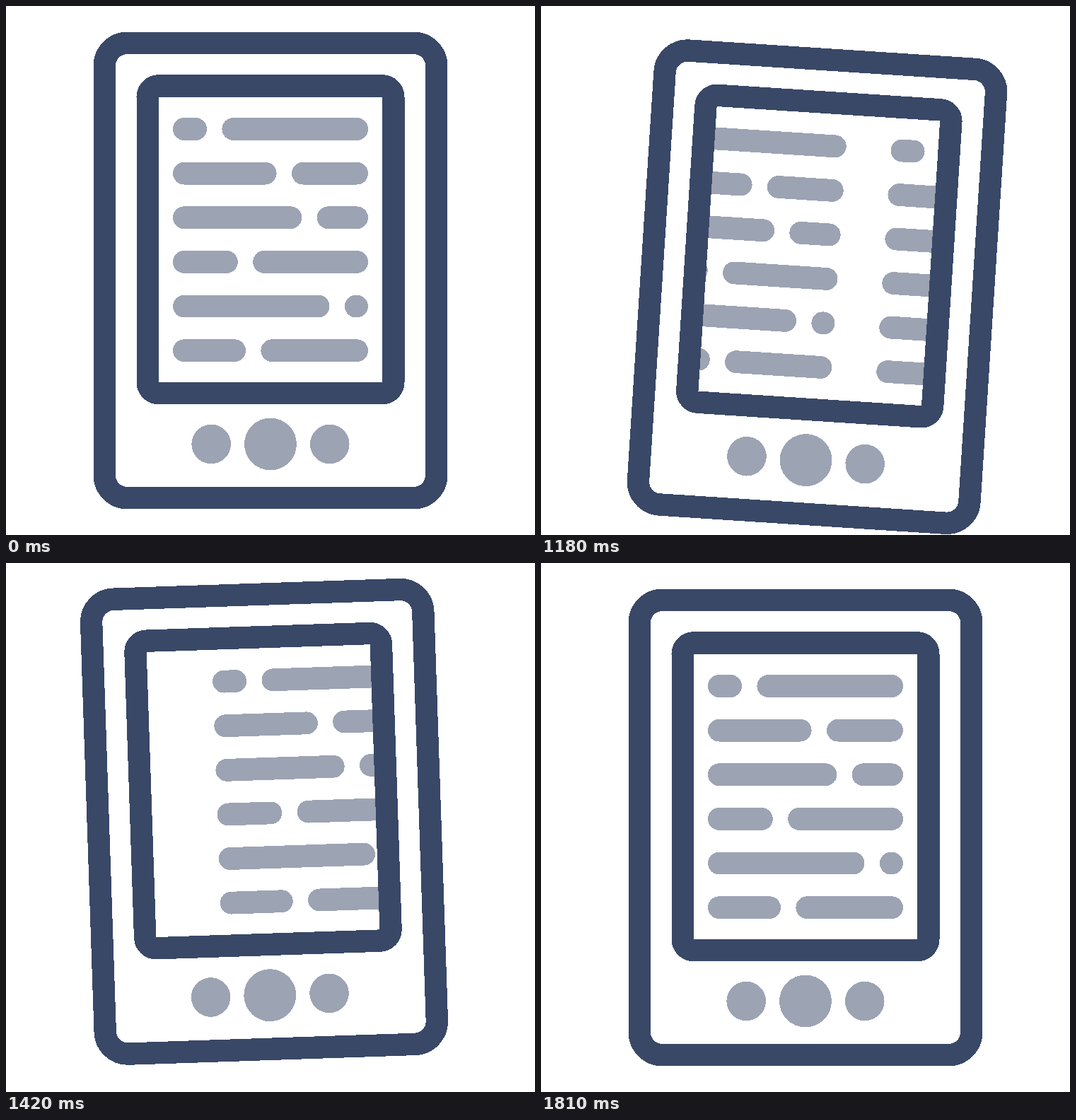
Animation, 748 px wide and 748 px high, one loop 1.84 s. Source, as an HTML page:

```html
<!DOCTYPE html>
<html lang="en">
<head>
<meta charset="utf-8">
<title>E-reader page turn</title>
<style>
  html, body { margin: 0; width: 100%; height: 100%; overflow: hidden; background: #fff; }
  svg { display: block; width: 100%; height: 100%; shape-rendering: crispEdges; }
  .frame { fill: none; stroke: #394867; stroke-width: 31.4; }
  .soft { fill: #9ca3b3; }
</style>
</head>
<body>
<svg viewBox="0 0 748 748">
  <defs>
    <clipPath id="screen"><rect x="200.2" y="112.9" width="347.6" height="434.8"/></clipPath>
    <g id="page" class="soft"></g>
  </defs>
  <g id="device">
    <g clip-path="url(#screen)">
      <use id="oldPage" href="#page"/>
      <use id="newPage" href="#page"/>
    </g>
    <rect class="frame" x="139.3" y="52.4" width="469.4" height="643.2" rx="32"/>
    <rect class="frame" x="200.2" y="112.9" width="347.6" height="434.8" rx="15.7"/>
    <g class="soft">
      <circle cx="290.2" cy="619.5" r="27.8"/>
      <circle cx="374" cy="619.5" r="37"/>
      <circle id="next" cx="457.8" cy="619.5" r="27.8"/>
    </g>
  </g>
</svg>
<script>
const $ = id => document.getElementById(id);
const LOOP = 1840, HOLD = 1030, STEP = 30;

// Each text row is a full-width line with one gap, given by where the gap starts.
const LEFT = 236, RIGHT = 512, GAP = 21.4;
const pill = (x1, x2, y) =>
  `<rect x="${x1}" y="${y - 15.9}" width="${x2 - x1}" height="31.8" rx="15.9"/>`;
$('page').innerHTML = [284, 382.6, 418.3, 327.8, 457.5, 339].map((gap, i) => {
  const y = 174 + i * 62.64;
  return pill(LEFT, gap, y) + pill(gap + GAP, RIGHT, y);
}).join('');

// Ease in and out from 0 to 1 between two steps.
function ease(n, from, to) {
  const t = Math.min(1, Math.max(0, (n - from) / (to - from)));
  return t * t * (3 - 2 * t);
}

// Swing right, then left, then settle.
const tilt = n => 4 * ease(n, 0, 5.3) - 6 * ease(n, 4.7, 14.6) + 2 * ease(n, 16, 25);
// Pushed down by the tap, rebounding slightly past rest.
const drop = n => 12.5 * ease(n, 0, 2.5) - 13.7 * ease(n, 2.5, 11) + 1.2 * ease(n, 11, 16);
const press = n => 1 - 0.55 * (ease(n, 0, 2.5) - ease(n, 2.5, 5.5));
const leave = n => -365 * ease(n, 0, 16.5);
const enter = n => 416 * Math.max(0, 1 - n / 26) ** 2.27;

function draw(now) {
  const ms = now % LOOP;
  const n = ms < HOLD ? 0 : Math.floor((ms - HOLD) / STEP) + 1;
  $('device').setAttribute('transform', `translate(0 ${drop(n)}) rotate(${tilt(n)} 140 636)`);
  $('oldPage').setAttribute('x', leave(n));
  $('newPage').setAttribute('x', enter(n));
  $('next').setAttribute('r', 27.8 * press(n));
}

const start = performance.now();
function tick() {
  draw(performance.now() - start);
  requestAnimationFrame(tick);
}
tick();
</script>
</body>
</html>
```
